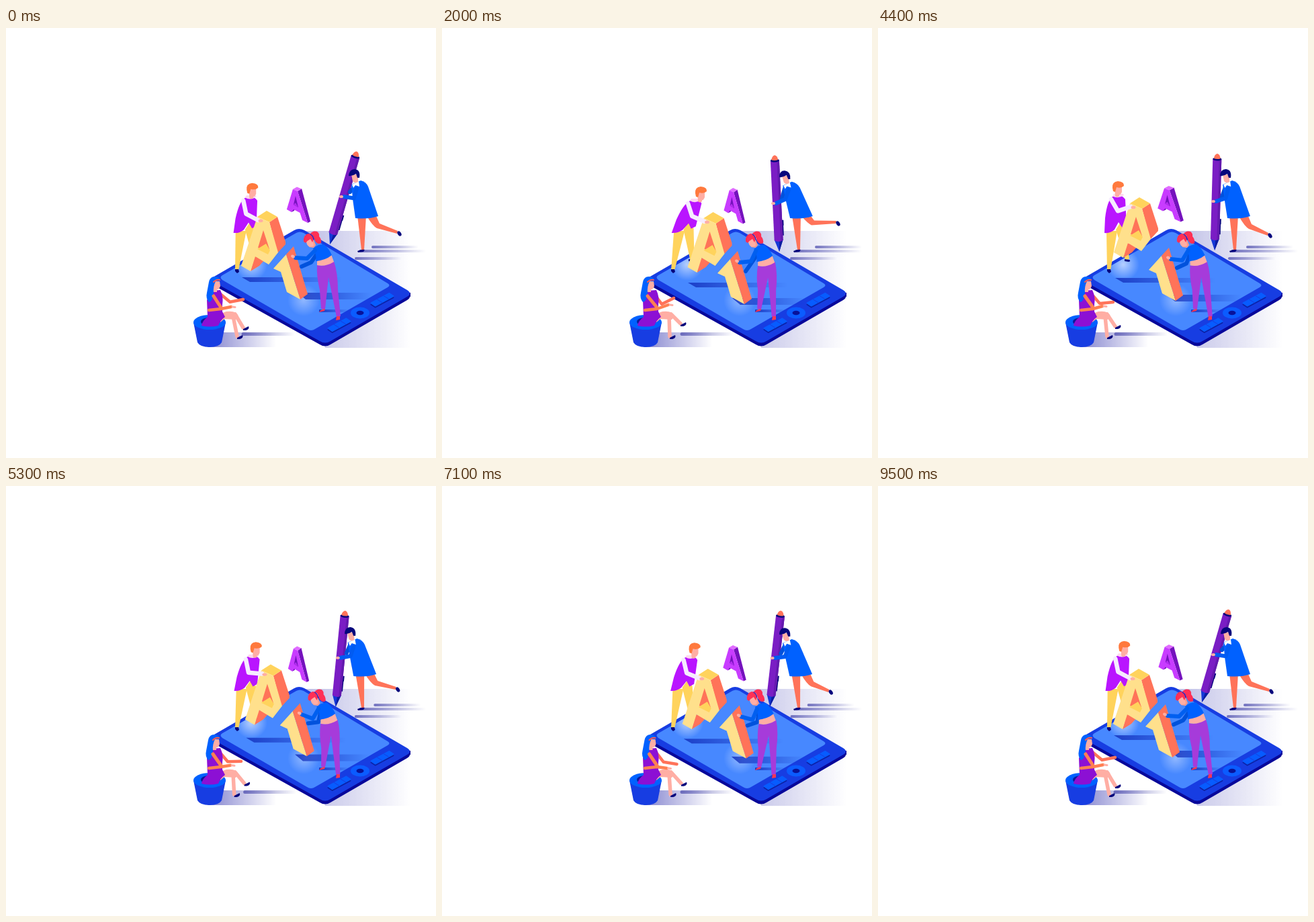
These frames come from a looping animation (640x640 px, 9.6 s). An HTML page with a canvas:

```html
<!DOCTYPE html>
<html>
<head>
<meta charset="utf-8">
<style>
html, body { margin: 0; height: 100%; overflow: hidden; background: #fff; }
canvas { display: block; width: 100%; height: 100%; }
</style>
</head>
<body>
<canvas width="640" height="640"></canvas>
<script>
const c = document.querySelector('canvas').getContext('2d');
const LOOP = 9600, TIMES = [0, 2000, 3400, 4400, 6100, 8100, 9500];
const NAVY = '#06067c', BLUE = '#0061ff', DEEP = '#173de2', CORAL = '#ff7359',
      CREAM = '#ffe08c', GOLD = '#ffd35c', SKIN = '#ffaea4', PINK = '#ff9c8c';
let now = 0;

// Value at the current time of a looping curve through six poses.
function track(...v) {
  const at = i => v[(i + 7) % 7], time = i => TIMES[(i + 7) % 7] + LOOP * Math.floor(i / 7);
  v.push(v[0]);
  const slope = i => {
    const a = (at(i) - at(i - 1)) / (time(i) - time(i - 1));
    const b = (at(i + 1) - at(i)) / (time(i + 1) - time(i));
    return a * b > 0 ? 2 * a * b / (a + b) : 0;
  };
  let i = 6;
  while (time(i) > now) i--;
  const d = time(i + 1) - time(i), u = (now - time(i)) / d, w = 1 - u;
  return at(i) * w * w * (1 + 2 * u) + at(i + 1) * u * u * (3 - 2 * u)
    + d * u * w * (slope(i) * w - slope(i + 1) * u);
}

function shape(color, d) {
  c.fillStyle = color;
  c.fill(new Path2D(d));
}

function oval(color, x, y, rx, ry, turn = 0) {
  c.fillStyle = color;
  c.beginPath();
  c.ellipse(x, y, rx, ry, turn, 0, 7);
  c.fill();
}

function line(color, width, d) {
  c.strokeStyle = color;
  c.lineWidth = width;
  c.lineCap = c.lineJoin = 'round';
  c.stroke(new Path2D(d));
}

function fade(x0, x1, rgb, alpha) {
  const g = c.createLinearGradient(x0, 0, x1, 0);
  g.addColorStop(0, `rgba(${rgb},${alpha})`);
  g.addColorStop(1, `rgba(${rgb},0)`);
  return g;
}

function moved(x, y, draw) {
  c.save();
  c.translate(x, y);
  draw();
  c.restore();
}

// Shear a figure: the row at base shifts by bx, the row h above it by (dx, dy).
function lean(base, h, dx, dy, bx, draw) {
  const s = (dx - bx) / h;
  c.save();
  c.transform(1, 0, -s, 1 - dy / h, bx + s * base, dy * base / h);
  draw();
  c.restore();
}

// Two equal bones from (x, y) to a hand.
function limb(color, width, x, y, hx, hy, bone, bend) {
  const dx = hx - x, dy = hy - y, d = Math.hypot(dx, dy);
  const k = bend * Math.sqrt(Math.max(0, bone * bone - d * d / 4)) / d;
  line(color, width, `M${x} ${y}L${x + dx / 2 - dy * k} ${y + dy / 2 + dx * k}L${hx} ${hy}`);
}

function button(x, y) {
  moved(x, y, () => {
    for (const [dy, color] of [[2, '#0b22a8'], [0, '#075cff']]) {
      const d = `M-16 ${4.5 + dy}L11 ${-10 + dy}L17 ${-6 + dy}L-10 ${8.5 + dy}Z`;
      shape(color, d);
      line(color, 2, d);
    }
    line(DEEP, 1, 'M-7 -1L1 4M3 -6L10 -2');
  });
}

function glow(x, y, r, alpha) {
  const g = c.createRadialGradient(x, y, 0, x, y, r);
  g.addColorStop(0, `rgba(255,255,255,${alpha})`);
  g.addColorStop(1, 'rgba(255,255,255,0)');
  oval(g, x, y, r, r);
}

function floor() {
  shape(fade(430, 602, '160,160,218', .75), 'M436 302H602V476H475Z');
  shape(fade(300, 402, '90,90,190', .75), 'M300 453H402V475H300Z');
  const strip = (x, y, length, w) => line(fade(x, x + length, '70,70,170', .7), w, `M${x} ${y}h${length}`);
  strip(track(546, 557, 550, 550, 548, 544), 326, 68, 4);
  strip(528, 332, 97, 4);
  strip(track(521, 520, 529, 523, 520, 521), 343, 68, 4);
  strip(track(353, 357, 355, 354, 357, 357), 455.5, 77, 5);
}

function tablet() {
  const body = 'M308 371L429 301Q436 297 444 301L597 390Q605 395 597 400L483 466Q475 471 467 466L309 378Q303 374 308 371Z';
  moved(0, 5, () => shape('#08089a', body));
  shape('#08089a', 'M304 374V380H310V374ZM595 394H602V400H595Z');
  shape(DEEP, body);
  const screen = 'M322 368L432 305Q437 302 443 305L568 380Q573 383 568 386L460 448Q454 452 448 448L322 375Q317 371 322 368Z';
  shape('#4788ff', screen);
  c.save();
  c.clip(new Path2D(screen));
  glow(365, 352, 24, .6);
  glow(443, 405, 24, .4);
  c.restore();
  moved(track(0, 15, 3, 2, 10, 6), track(0, 8, 2, 1, 6, 4), () =>
    shape(fade(351, 500, '20,50,190', .85), 'M351 371H500V378H363Z'));
  moved(track(0, -2, -8, -4, -4, -2), track(0, 8, 3, 3, 8, 9), () =>
    shape(fade(437, 545, '20,50,190', .85), 'M434 394H545V404H446Z'));
  shape(fade(466, 512, '20,50,190', .9), 'M466 419H512V423H466Z');
  button(495.5, 442.5);
  button(559.5, 405);
  oval('#0b5cff', 527, 424, 14, 8.5);
  oval('#08129a', 527, 424, 5.5, 3.2);
}

function purpleLetter() {
  const swing = Math.sin(now / 4800 * 2 * Math.PI);
  c.save();
  c.translate(435.3, 3.2 * swing);
  c.scale(1.01 - .19 * swing, 1);
  c.translate(-435.3, 0);
  shape('#7512bd', 'M434 243L440 239L453 288L449 290ZM425 274L429 272L432 266L428 266Z');
  shape('#e06cff', 'M427 240L433 236.5L440 239.5L434 243Z');
  shape('#c83cff', 'M427 240L434 243L449 290L441 286L437.5 275L428 270L425 274L418 270Z');
  shape('#7512bd', 'M431 250L428 263L435 267Z');
  shape('#b52cf0', 'M428 263L431 260L435 267Z');
  c.restore();
}

function bigLetter() {
  shape(CORAL, 'M364 362L370 340L386 344L377 354ZM392 289L404 281L416 318L416 322L404 335Z');
  shape(GOLD, 'M374 281L388 272L404 281L392 289Z');
  shape(CREAM, 'M374 281L392 289L405 334L391 352L371 340L364 362L350 354Z');
  shape(CORAL, 'M383 301L375 327L389 332L392 329Z');
  shape(GOLD, 'M374 329L387 321L393 331L390 337Z');
}

function legPiece() {
  shape(CREAM, 'M398 358L417 337L438 404L418 393L409 363Z');
  shape(CORAL, 'M417 337L428 325L449 396L438 404Z');
}

// Returns the arm, which is drawn later over the letter.
function vestMan(ax, ay) {
  const k = track(.33, 1, .06, 0, .96, .35);
  lean(361, 57, 5 * k, 0, 0, () => {
    shape(GOLD, 'M354 300L361 289L369 298L374 344L368 345Z');
    shape(GOLD, 'M340 302H356L346 361H341Z');
  });
  shape(NAVY, 'M341 359H346L347 363L344 365L341 362ZM367 344L374 345Q377 347 373 348L367 347Z');
  lean(304, 66, 23 * k, 8 * k, 5 * k, () =>
    shape('#b915ff', 'M349 251Q341 257 338 283L337 305Q346 306 352 300L358 289L364 298L370 294L368 255Q364 249 357 249Z'));
  moved(20 * k, 7 * k, () => shape('#ffd8ee', 'M349 250Q357 255 366 249L365 247H351Z'));
  moved(28 * k, 8 * k, () => {
    shape(SKIN, 'M352 236H363V244Q361 249 359 248V250Q356 253 353 250Z');
    shape('#ff793d', 'M349 238Q348 229 357 228Q367 229 366 235Q362 239 355 237L353 244L350 243Z');
  });
  const x = 347 + 19 * k, y = 255 + 6 * k, hx = 379 + ax, hy = 287 + ay;
  return () => {
    limb('#f6ecff', 6.5, x, y, hx - 4, hy - 1, 20, 1);
    oval(SKIN, hx, hy, 3.5, 2.2);
  };
}

function standingWoman(px, py) {
  const k = track(0, .9, .4, .2, 1.05, 1.1);
  lean(428, 76, 8 * k, k, -k, () =>
    shape('#a63bda', 'M463 353Q475 356 488 347Q494 365 494 390L498 429L492 430L480 371L475 418L469 418L467 390Q462 370 463 353Z'));
  shape('#f33755', 'M466 423Q469 418 475 418L474 421ZM491 435L492 429H497V434Z');
  limb('#0052dc', 6, 463 + 8 * k, 336, 440 + px, 355 + py, 15.5, -1);
  moved(8 * k, k, () => {
    shape(SKIN, 'M463 347L484 337L488 348Q475 356 463 353Z');
    shape(BLUE, 'M457 328Q465 321 473 322Q480 327 485 338Q475 346 461 347Q463 338 457 328Z');
  });
  limb('#005ff0', 6, 460 + 8 * k, 331 + k, 431 + px, 342 + py, 17, -1);
  oval(SKIN, 427 + px, 340 + py, 3, 2.2, .5);
  moved(10 * k, 0, () => {
    shape('#ff3055', 'M453 306Q457 301 463 303Q467 306 466 310Q470 315 469 320Q464 323 460 317L457 309Z');
    shape(PINK, 'M450 314L457 313L461 323L458 327L451 326Z');
    shape(SKIN, 'M446 315L456 312L458 324Q451 328 448 322Z');
    shape('#ff3055', 'M443 318Q442 308 450 306Q457 306 458 314L456 319L453 314Q449 316 446 320Z');
    line('#1728c8', 1.2, 'M453 307Q457 309 458 315');
  });
}

function pencil() {
  c.save();
  c.translate(track(482, 502, 505, 501, 484, 492), track(322, 333, 328, 331, 327, 330));
  c.rotate(track(16.2, -2.8, 1.6, 1.6, 9.1, 4) * Math.PI / 180);
  shape(NAVY, 'M6 -47H8.5V-39H8V-24H5Z');
  shape('#1438d8', 'M0 0L-6.5 -18H6.5Z');
  shape('#0b1ca0', 'M0 0L1 -18H6.5Z');
  shape('#7a1dc4', 'M-6.5 -17V-136H6.5V-17Q0 -13 -6.5 -17Z');
  shape('#641aae', 'M3 -16V-136H6.5V-17Z');
  oval(NAVY, 0, -136, 6.5, 2.5);
  shape(CORAL, 'M-5 -137Q-4 -143 0 -144Q4 -143 5 -137Q0 -135 -5 -137Z');
  c.restore();
}

function pencilMan() {
  const dx = track(0, -8, 10, -1, -8, -8), dy = track(0, 2, -1, 0, 0, 2), hem = track(0, -2, 4, 0, -4, -1);
  const fx = track(585, 589, 580, 583, 582, 575), fy = track(306, 291, 315, 309, 300, 314);
  const hx = track(499, 493, 503, 499, 491, 493), hy = track(251, 261, 254, 258, 254, 258);
  const knee = 293 + (fy - 306) * .3, ax = fx - 2, ay = fy - 2;
  line('#0052dc', 6, `M${518 + dx} ${237 + dy}L${hx + 13} ${hy - 7}`);
  shape(CORAL, `M${537 + hem} 280L${551 + hem} 280L${556 + hem} ${knee - 2}L${ax} ${ay - 2}L${ax - 1} ${ay + 2}L${552 + hem} ${knee + 5}Q${546 + hem} ${knee + 2} ${537 + hem} 280Z`);
  oval(NAVY, fx + .5, fy, 2.5, 4, -.6);
  lean(330, 50, hem, 0, 0, () => shape(CORAL, 'M523 279H536L533 330H529Z'));
  shape(NAVY, 'M523 332Q529 329 534 330L532 333L524 334Z');
  lean(282, 62, dx, dy, hem, () => {
    shape(BLUE, 'M514 233L528 227Q536 229 539 236L554 280Q540 285 520 283Q516 258 514 233Z');
    shape('#fff', 'M515 233L525 228L526 236L520 234L517 238Z');
    shape(SKIN, 'M514 218H524V229Q519 232 516 228Z');
    shape(NAVY, 'M510 220Q511 210 519 210Q528 211 526 223L523 223L521 217Q515 221 510 220Z');
  });
  limb('#005bf2', 6, 522 + dx * .75, 239 + dy, hx + 4, hy, 15, -1);
  oval(SKIN, hx, hy, 3, 2);
}

function seatedWoman() {
  const sway = track(0, -3, -2, -1, -1, 0);
  const s1x = track(357, 359, 357, 357, 360, 360), s1y = track(447, 441, 447, 445, 443, 445);
  const s2x = track(348, 343, 346, 345, 343, 346);
  shape(DEEP, 'M279 438L285 468Q289 475 303 475Q317 475 321 468L327 438Z');
  oval(BLUE, 303, 438, 24, 11);
  oval('#0a1a9c', 302, 437, 12, 6);
  limb(CORAL, 4.5, 318 + sway, 395, track(353, 345, 343, 350, 350, 349), track(404, 402, 413, 408, 412, 415), 20, 1);
  line(SKIN, 5.5, `M338 429L${s2x - 4} 459`);
  line(SKIN, 5.5, `M341 426L${s1x - 4} ${s1y - 1}`);
  shape(SKIN, 'M318 431Q320 424 328 422Q343 420 346 429L342 434L325 433L319 438Z');
  shape('#8c10d4', 'M306 391L319 390Q324 400 322 412L322 422L326 430Q319 435 316 443Q303 446 291 443Q292 436 300 430L299 405Z');
  for (const [x, y] of [[s1x, s1y], [s2x, 460]])
    shape(NAVY, `M${x - 4} ${y + 1}L${x + 4} ${y - 3}Q${x + 6} ${y + 1} ${x} ${y + 3}L${x - 4} ${y + 3}Z`);
  moved(sway, 0, () => {
    shape(SKIN, 'M309 377H318L319 384Q317 390 314 389V393H307Z');
    shape(BLUE, 'M302 378Q304 369 312 370Q319 371 319 376L312 377Q308 385 309 394Q308 407 302 408Q297 402 299 394Z');
    line('#ff5a50', 2, 'M309 378Q313 374 318 375');
  });
  const hx = track(341, 343, 347, 340, 340, 341), hy = track(415, 412, 416, 414, 418, 421);
  line('#ff8052', 5, `M${309 + sway} 399L320 416`);
  line('#ff8052', 4.5, `M302 420L320 418L${hx - 6} ${hy}`);
  line(SKIN, 3, `M${hx - 4} ${hy}L${hx} ${hy + .5}`);
}

function draw() {
  now = Math.floor(performance.now() % LOOP / 100) * 100;
  c.clearRect(0, 0, 640, 640);
  const ax = track(0, 15.5, 1.5, 1, 10, 4), ay = track(0, 2, -11, -20, 5, -5);
  const px = track(0, 12, 8, 5, 14, 15), py = track(0, 7, -6, 2, -5, 8);
  floor();
  tablet();
  purpleLetter();
  const vestArm = vestMan(ax, ay);
  moved(ax, ay, bigLetter);
  vestArm();
  moved(px, py, legPiece);
  standingWoman(px, py);
  pencil();
  pencilMan();
  seatedWoman();
  requestAnimationFrame(draw);
}
draw();
</script>
</body>
</html>
```
